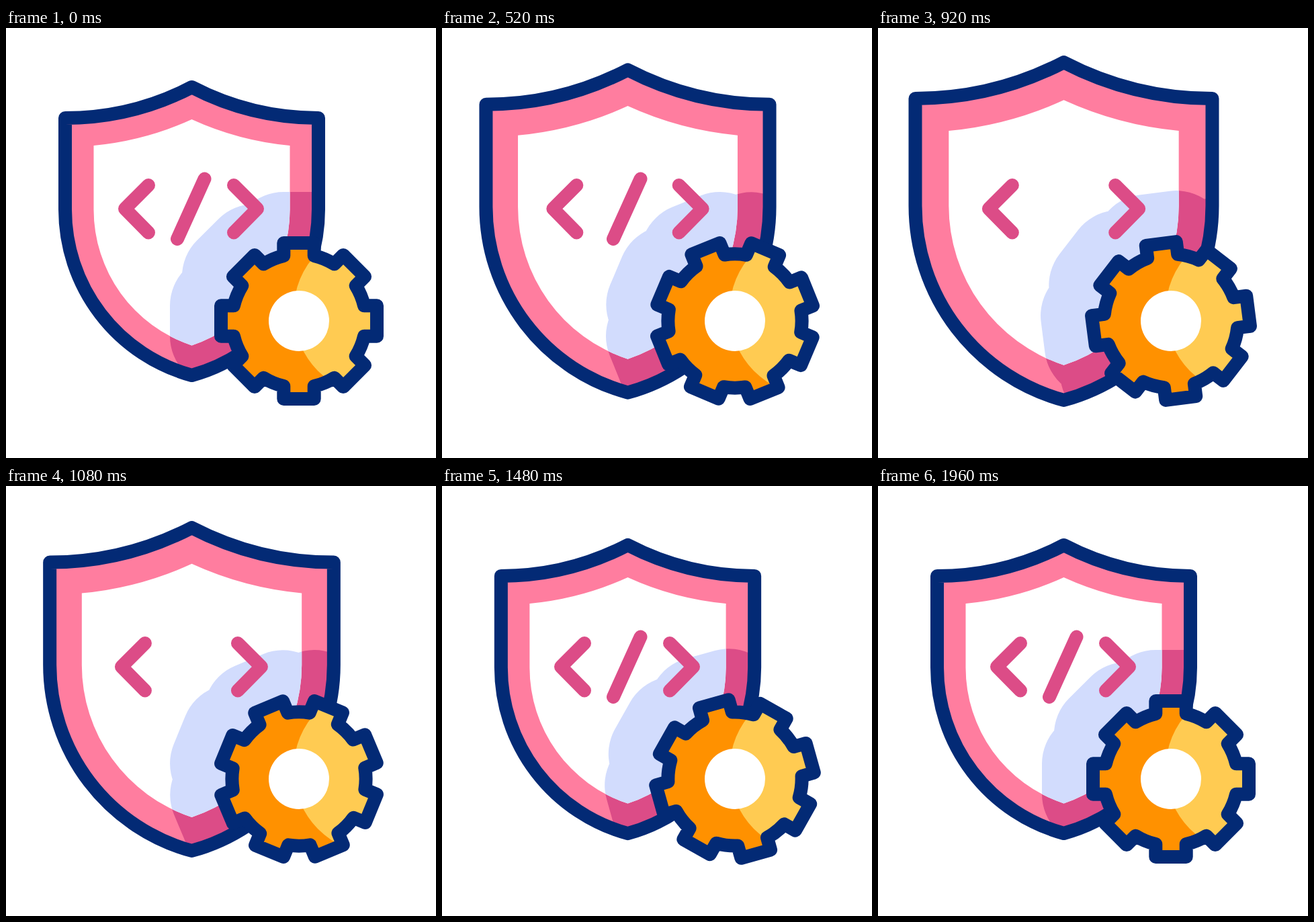
Animation of 640x640 px, one loop 2 s. Source, as an HTML page:

```html
<!DOCTYPE html>
<html lang="en">
<head>
<meta charset="utf-8">
<title>Shield and gear</title>
<style>
  html, body { margin: 0; width: 100%; height: 100%; overflow: hidden; background: #fff; }
  svg { display: block; width: 100%; height: 100%; }
  .line { fill: none; stroke-width: 20; stroke-linecap: round; stroke-linejoin: round; }
  .navy { stroke: #032a75; }
  .rose { stroke: #dc4c87; }
  .shadow { stroke-width: 152; stroke-linejoin: round; }
</style>
</head>
<body>
<svg viewBox="0 0 640 640">
  <defs>
    <path id="shield" d="M276.5 88A409 409 0 0 0 465 134V270A256 256 0 0 1 276.5 517A256 256 0 0 1 88 270V134A409 409 0 0 0 276.5 88Z"/>
    <path id="panel" d="M276.5 136A452 452 0 0 0 422.5 175V270A213 213 0 0 1 276.5 472.5A213 213 0 0 1 130.5 270V175A452 452 0 0 0 276.5 136Z"/>
    <path id="gear"/>
    <clipPath id="inShield"><use href="#shield" class="grow"/></clipPath>
    <clipPath id="inPanel"><use href="#panel" class="grow"/></clipPath>
    <clipPath id="inGear"><use href="#gear" class="spin"/></clipPath>
  </defs>

  <use href="#shield" class="grow" fill="#ff7d9f"/>
  <g clip-path="url(#inShield)">
    <use href="#gear" class="spin shadow" fill="#dc4c87" stroke="#dc4c87"/>
  </g>
  <use href="#panel" class="grow" fill="#fff"/>
  <g clip-path="url(#inPanel)">
    <use href="#gear" class="spin shadow" fill="#d2dcfd" stroke="#d2dcfd"/>
  </g>

  <path id="left" class="line rose" d="M212 234L177 269L212 304.5"/>
  <path id="right" class="line rose" d="M339 234L374 269L339 304.5"/>
  <path id="slash" class="line rose"/>
  <path id="rim" class="line navy"/>

  <g clip-path="url(#inGear)">
    <rect x="300" y="300" width="272" height="272" fill="#ff9100"/>
    <circle cx="554" cy="422" r="126" fill="#ffcb52"/>
  </g>
  <circle cx="436" cy="436" r="45" fill="#fff"/>
  <use href="#gear" class="spin line navy"/>
</svg>
<script>
const LOOP = 2000, TEETH = 8;
const $ = id => document.getElementById(id);
const all = name => document.querySelectorAll('.' + name);
const growing = all('grow'), spinning = all('spin');

function gearPath() {
  const half = 22.7, tip = 116, base = 97, r = Math.hypot(half, base);
  let d = '';
  for (let i = 0; i < TEETH; i++) {
    const a = i * 2 * Math.PI / TEETH, c = Math.cos(a), s = Math.sin(a);
    const at = (x, y) => `${(436 + x * c - y * s).toFixed(2)} ${(436 + x * s + y * c).toFixed(2)}`;
    d += (i ? `A${r} ${r} 0 0 1 ` : 'M') + at(-half, -base) +
      'L' + at(-half, -tip) + 'L' + at(half, -tip) + 'L' + at(half, -base);
  }
  return d + `A${r} ${r} 0 0 1 ${436 - half} ${436 - base}Z`;
}

// cubic-bezier(.5, 0, .5, 1)
function ease(x) {
  if (x <= 0) return 0;
  if (x >= 1) return 1;
  let lo = 0, hi = 1;
  for (let i = 0; i < 24; i++) {
    const m = (lo + hi) / 2;
    if (1.5 * m * (1 - m) + m ** 3 < x) lo = m; else hi = m;
  }
  return lo * lo * (3 - 2 * lo);
}
const ramp = (t, from, to) => ease((t - from) / (to - from));

// The rim keeps its line weight, so its geometry is scaled instead of the element.
function rimPath(k) {
  const X = x => 276.5 + (x - 276.5) * k, Y = y => 302.5 + (y - 302.5) * k;
  const arc = (r, sweep, x, y) => `A${r * k} ${r * k} 0 0 ${sweep} ${X(x)} ${Y(y)}`;
  return `M${X(276.5)} ${Y(88)}` + arc(409, 0, 465, 134) + `V${Y(270)}` +
    arc(256, 1, 276.5, 517) + arc(256, 1, 88, 270) + `V${Y(134)}` +
    arc(409, 0, 276.5, 88) + 'Z';
}

function draw(t) {
  const scale = 1 + 0.186 * (ramp(t, 200, 760) - ramp(t, 760, 1520));
  const grow = `translate(276.5 302.5) scale(${scale}) translate(-276.5 -302.5)`;
  growing.forEach(el => el.setAttribute('transform', grow));
  $('rim').setAttribute('d', rimPath(scale));

  const spin = `rotate(${180 * ramp(t, 0, 1920)} 436 436)`;
  spinning.forEach(el => el.setAttribute('transform', spin));

  const spread = ramp(t, 0, 760) - ramp(t, 760, 1320);
  $('left').setAttribute('transform', `translate(${-14.2 * spread} 0)`);
  $('right').setAttribute('transform', `translate(${16.6 * spread} 0)`);

  const shown = 1 - ramp(t, 520, 760) + ramp(t, 1080, 1320);
  $('slash').setAttribute('d', `M255 314L${255 + 40.5 * shown} ${314 - 89.5 * shown}`);
  $('slash').setAttribute('visibility', shown > 0.001 ? 'visible' : 'hidden');
}

$('gear').setAttribute('d', gearPath());
const start = performance.now();
function tick() {
  draw((performance.now() - start) % LOOP);
  requestAnimationFrame(tick);
}
draw(0);
requestAnimationFrame(tick);
</script>
</body>
</html>
```
